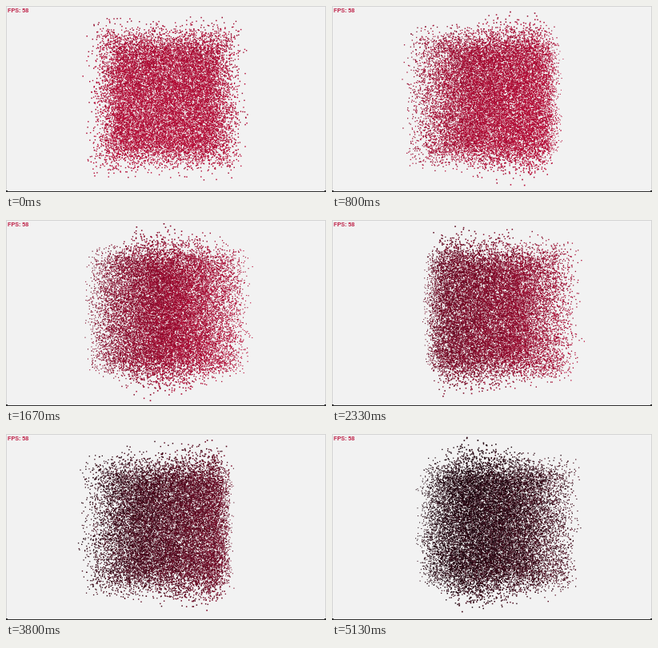
An HTML page with a canvas for the animation above (5.2 s loop, 400x233 px).

```html
<!DOCTYPE html>
<html lang="en">
<head>
<meta charset="utf-8">
<title>Rotating particle cube</title>
<style>
  html, body { margin: 0; width: 100%; height: 100%; overflow: hidden; background: #f2f2f2; }
  canvas { position: absolute; left: 0; top: 0; width: 400px; height: 233px; }
  #fps {
    position: absolute; left: 2px; top: 1px;
    font: bold 7.2px/9px "Liberation Sans", Arial, sans-serif;
    color: #be2147; white-space: pre;
  }
</style>
</head>
<body>
<canvas id="stage" width="400" height="233"></canvas>
<div id="fps">FPS: 58</div>
<script>
const WIDTH = 400, HEIGHT = 233;
const LOOP = 5200, STEPS = 78, STEP = LOOP / STEPS;
const COUNT = 21000;
const CENTER_X = 201, CENTER_Y = 115;
const CAMERA = 3.7;      // camera distance in half cube sides
const HALF_SIDE = 76;    // half side in pixels at the cube's middle
const CORE = 0.92, FRINGE = 0.15;
const DOT = 1.1;
const SPIN = 0.5;        // radians per second
const LIGHT_UP = 0.33, LIGHT_FLAT = 0.94;
const SIDE_GLOW = 1.5;   // strengthens shading across the cube
const SLABS = 40, SHADES = 32;

const ctx = document.getElementById('stage').getContext('2d');

function seededRandom(seed) {
  return () => {
    seed = (seed + 0x6D2B79F5) | 0;
    let n = Math.imul(seed ^ (seed >>> 15), 1 | seed);
    n = (n + Math.imul(n ^ (n >>> 7), 61 | n)) ^ n;
    return ((n ^ (n >>> 14)) >>> 0) / 4294967296;
  };
}

const random = seededRandom(58);
const signed = () => random() * 2 - 1;
// Uniform inside the cube with a soft edge
const spread = () => CORE * signed() + FRINGE * (signed() + signed()) / 2;
const dots = Array.from({ length: COUNT }, () => ({
  x: spread(), y: spread(), z: spread(), tint: signed() * 0.14
}));

const mix = (a, b, k) => Math.round(a + (b - a) * k);
const shades = Array.from({ length: SHADES }, (_, i) => {
  const k = i / (SHADES - 1);
  return `rgb(${mix(26, 186, k)},${mix(3, 10, k)},${mix(12, 54, k)})`;
});

const slabs = Array.from({ length: SLABS }, () => []);
const slabFor = z => {
  const nearness = (z / 1.5 + 1) / 2;
  return slabs[Math.max(0, Math.min(SLABS - 1, Math.floor(nearness * SLABS)))];
};

function drawWindow() {
  ctx.fillStyle = '#f2f2f2';
  ctx.fillRect(0, 0, WIDTH, HEIGHT);
  ctx.fillStyle = '#d4d4d4';
  ctx.fillRect(0, 0, WIDTH, 1);
  ctx.fillRect(0, 0, 1, HEIGHT);
  ctx.fillRect(WIDTH - 1, 0, 1, HEIGHT);
  ctx.fillStyle = '#303030';
  ctx.fillRect(0, HEIGHT - 1, WIDTH, 1);
  ctx.fillRect(0, HEIGHT - 2, 2, 1);
  ctx.fillRect(WIDTH - 2, HEIGHT - 2, 2, 1);
}

function drawCube(angle) {
  const sin = Math.sin(angle), cos = Math.cos(angle);
  for (const slab of slabs) slab.length = 0;

  for (const dot of dots) {
    const x = dot.x * cos - dot.z * sin;
    const z = dot.x * sin + dot.z * cos;
    const depth = CAMERA - z;
    // How much of the lit side faces the camera
    const facing = (LIGHT_FLAT * (SIDE_GLOW * x * sin + depth * cos) + LIGHT_UP * dot.y)
      / Math.hypot(x, dot.y, depth);
    const lit = Math.min(1, Math.max(0, 0.47 + facing / 2 + dot.tint));
    slabFor(z).push({ x, y: dot.y, scale: CAMERA / depth, lit });
  }

  for (const slab of slabs) {
    for (const { x, y, scale, lit } of slab) {
      const size = DOT * scale;
      ctx.fillStyle = shades[Math.round(lit * (SHADES - 1))];
      ctx.fillRect(
        CENTER_X + x * HALF_SIDE * scale - size / 2,
        CENTER_Y + y * HALF_SIDE * scale - size / 2,
        size, size);
    }
  }
}

const start = performance.now();
let shown = -1;

function update() {
  const time = (performance.now() - start) % LOOP;
  const step = Math.min(STEPS - 1, Math.floor((time + 3.4) / STEP));
  if (step !== shown) {
    shown = step;
    drawWindow();
    drawCube(SPIN * step * STEP / 1000);
  }
  requestAnimationFrame(update);
}
update();
</script>
</body>
</html>
```
